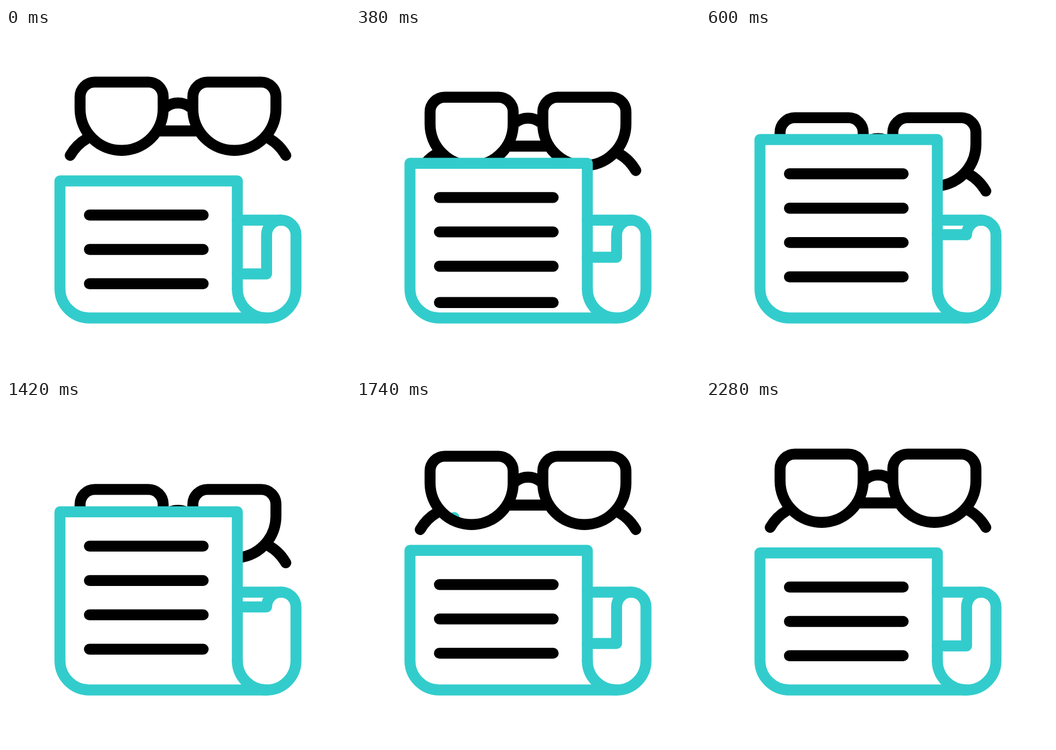
An HTML page that plays this animation: 640x640 px, repeating every 2.4 s.

```html
<!DOCTYPE html>
<html lang="en">
<head>
<meta charset="utf-8">
<title>Glasses and newspaper</title>
<style>
  html, body { margin: 0; height: 100%; overflow: hidden; background: #fff; }
  svg { display: block; width: 100vw; height: 100vh; }
  .ink, .teal { fill: none; stroke: #000; stroke-width: 20.4; stroke-linecap: round; stroke-linejoin: round; }
  .teal { stroke: #3cc; }
</style>
</head>
<body>
<svg viewBox="0 0 640 640">
  <defs>
    <path id="lens" d="M137.8 128a27.4 27.4 0 0 1 27.4-27.4H265a27.4 27.4 0 0 1 27.4 27.4V150.5a77.3 77.3 0 0 1-154.6 0Z"/>
    <path id="temple" d="M119.5 237C127 224 137 213.500 150 206"/>
    <clipPath id="lenses">
      <use href="#lens"/>
      <use href="#lens" x="209.8"/>
    </clipPath>
    <clipPath id="page"><rect x="100" y="200" width="330" height="339.5"/></clipPath>
  </defs>

  <g id="glasses">
    <g id="shine" class="teal" clip-path="url(#lenses)"></g>
    <g class="ink">
      <use href="#lens"/>
      <use href="#lens" x="209.8"/>
      <use href="#temple"/>
      <use href="#temple" transform="matrix(-1 0 0 1 640 0)"/>
      <path d="M297.500 147a37.500 37.500 0 0 1 45 0M287 191.500H353"/>
    </g>
  </g>

  <path id="paper" fill="#fff"/>
  <g clip-path="url(#page)"><path id="lastLine" class="ink" d="M155.200 546H366.800"/></g>
  <path id="sheet" class="teal"/>
  <path class="teal" d="M430.400 357.500H512a27.500 27.500 0 0 1 27.500 27.500V485a54.550 54.550 0 0 1-109.100 0"/>
  <path id="fold" class="teal"/>
  <path id="lines" class="ink" d="M155.200 348H366.800M155.200 412H366.800M155.200 475.800H366.800"/>
</svg>
<script>
const $ = id => document.getElementById(id);
const LOOP = 2400, STEP = 20;
const DIR = [0.636, -0.772];   // slant of the reflections

// Leading tip, direction along the slant, length
const stripes = [
  [173, 176, -1, 100],
  [248, 135, 1, 112],
  [388, 174, -1, 100],
  [459, 147.5, 1, 97]
].map(([x, y, sign, length]) => {
  const el = document.createElementNS("http://www.w3.org/2000/svg", "path");
  $("shine").append(el);
  return { el, x, y, sign, length };
});

function ease(t, start, end) {
  const x = Math.min(1, Math.max(0, (t - start) / (end - start)));
  return x * x * (3 - 2 * x);
}

const shiftY = (id, dy) => $(id).setAttribute("transform", `translate(0 ${dy})`);

function draw(t) {
  const rise = ease(t, 200, 600) - ease(t, 1400, 1800);
  const outline = `M430.400 485V${284.5 - 77 * rise}H100.400V485a54.500 54.500 0 0 0 54.500 54.500H485`;

  shiftY("glasses", 66.3 * rise);
  shiftY("lines", -76.7 * rise);
  shiftY("lastLine", -83 * rise);
  $("paper").setAttribute("d", outline);
  $("sheet").setAttribute("d", outline);
  $("fold").setAttribute("d", `M512 357.500A27.500 27.500 0 0 0 484.800 385V${457.5 - 73 * rise}H430.400`);

  const travel = 300 * (ease(t, 1600, 2400) - 0.425);
  for (const { el, x, y, sign, length } of stripes) {
    const at = d => `${x + DIR[0] * sign * d} ${y + DIR[1] * sign * d}`;
    el.setAttribute("d", `M${at(travel)}L${at(travel - length)}`);
  }
}

const begin = performance.now();
function tick() {
  const t = (performance.now() - begin) % LOOP;
  draw(Math.floor(t / STEP) * STEP);
  requestAnimationFrame(tick);
}
tick();
</script>
</body>
</html>
```
